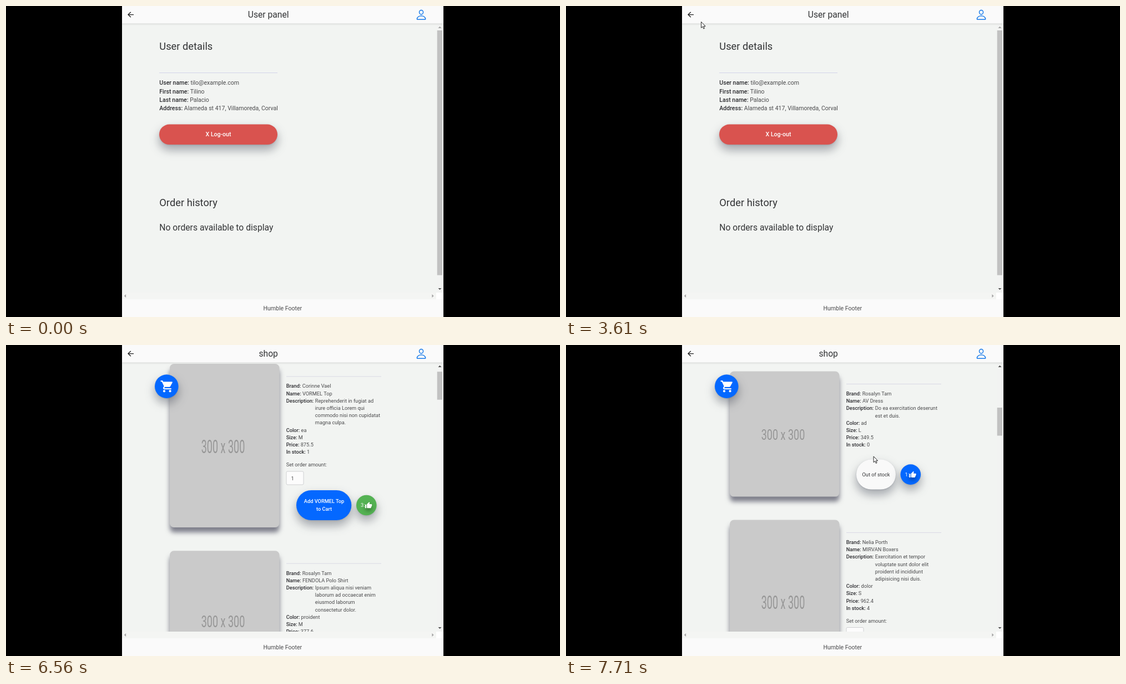
Animation of 998x561 px, one loop 8 s. Source, as an HTML page:

```html
<!DOCTYPE html>
<html lang="en">
<head>
<meta charset="utf-8">
<title>Shop</title>
<style>
html, body { margin: 0; width: 100%; height: 100%; overflow: hidden; background: #000; }
svg { display: block; width: 100vw; height: 100vh; }
text { font-family: Roboto, sans-serif; fill: #4a4a4c; white-space: pre; }
.dark { fill: #333436; }
.label { font-weight: 500; fill: #2c2c30; }
.medium { font-weight: 500; }
.white { fill: #fff; }
.card { fill: #cacaca; filter: drop-shadow(0 9px 4.5px rgba(20, 20, 45, .52)); }
.raised { filter: drop-shadow(0 9px 9px rgba(40, 45, 60, .36)) drop-shadow(0 1px 1px rgba(40, 45, 60, .16)); }
.bar { filter: drop-shadow(0 1px 1.5px rgba(0, 0, 0, .14)); }
</style>
</head>
<body>
<svg id="stage" viewBox="0 0 998 561" preserveAspectRatio="none">
  <defs>
    <clipPath id="app"><rect x="209" width="579" height="561"/></clipPath>
    <clipPath id="view"><rect x="209" y="31" width="567" height="486"/></clipPath>
    <path id="thumb" d="M1 21h4V9H1v12zm22-11c0-1.1-.9-2-2-2h-6.3l.95-4.6c.1-.6-.1-1-.4-1.4L14.2 1 7.6 7.6C7.2 8 7 8.5 7 9v10c0 1.1.9 2 2 2h9c.8 0 1.5-.5 1.8-1.2l3-7c.1-.3.2-.5.2-.8z"/>
  </defs>
  <g id="root" clip-path="url(#app)"></g>
</svg>
<script>
const LOOP = 8000;
const root = document.getElementById('root');
const SMALL = 9.23, BODY = 10.55, TITLE = 15.7, HEAD = 18.3;
const PAGE = '#f2f4f2', BAR = '#fafafa', BLUE = '#0468ff', GREEN = '#54b253';

const attrs = o => Object.entries(o).map(([k, v]) => `${k}="${v}"`).join(' ');
const rect = (x, y, width, height, fill, more = {}) => `<rect ${attrs({ x, y, width, height, fill, ...more })}/>`;
// y is the middle of the capitals
const text = (x, y, size, str, cls = '', anchor = 'start') =>
  `<text x="${x}" y="${y + size * .355}" font-size="${size}" class="${cls}" text-anchor="${anchor}">${str}</text>`;
const field = (x, y, size, name, value) =>
  text(x, y, size, `<tspan class="label">${name}:</tspan> ${value}`);
const tri = (x, y, turn, fill, id = '') =>
  `<path ${id && `id="${id}"`} d="M-3 1.6L0-1.6L3 1.6z" fill="${fill}" transform="translate(${x} ${y}) rotate(${turn})"/>`;

function header(title) {
  return rect(209, 0, 579, 31.5, BAR, { class: 'bar' }) +
    text(472.7, 15.6, TITLE, title, 'dark', 'middle') +
    `<path d="M230 15.6H220.5M224.8 10.9L220 15.6L224.8 20.3" fill="none" stroke="#222" stroke-width="1.4"/>
     <g fill="none" stroke="#1478ea" stroke-width="36" stroke-linejoin="round" transform="translate(737.8 5.6) scale(.04)">
       <path d="M344 144C340 197 300 240 256 240S172 197 168 144C164 89 203 48 256 48S348 90 344 144z"/>
       <path d="M256 304C169 304 81 352 64 443C62 454 69 464 80 464H432C443 464 450 454 448 443C431 352 343 304 256 304z"/></g>`;
}

function scrollbars(id, thumbHeight) {
  return rect(776, 32, 12, 485, '#f2f3f2') + rect(209, 517, 566, 12, '#f4f5f3') + rect(775, 517, 13, 12, '#fff') +
    tri(781.5, 38.3, 0, '#a3a3a3', id + 'Up') + tri(781.5, 510.5, 180, '#505050') +
    tri(214.5, 523, -90, '#a3a3a3') + tri(769, 523, 90, '#a3a3a3') +
    rect(776.7, 44, 9.3, thumbHeight, '#c1c1c1', { id: id + 'Thumb' });
}

function like(x, y, count, fill) {
  return `<circle cx="${x}" cy="${y}" r="18.3" fill="${fill}" class="raised"/>` +
    text(x - 10.3, y, SMALL, count + ':', 'white') +
    `<use href="#thumb" fill="#fff" transform="translate(${x - 3} ${y - 6.4}) scale(.56)"
      style="filter:drop-shadow(0 8px 7px rgba(0,0,0,.4))"/>`;
}

function product(p, i) {
  const row = n => p.top + 40.2 + n * 13.2;
  const n = p.about.length;
  const stockY = row(n + 5);
  const buttonY = stockY + (p.stock ? 69 : 26.5);
  const height = buttonY + 67 - p.top;
  let s = rect(295, p.top, 197.5, height, '#cacaca', { rx: 7.5, class: 'card' }) +
    `<g transform="translate(391 ${p.top + height / 2 + 1.5}) scale(.53 ${height / 300})">
      <text y="12" font-size="34" text-anchor="middle" style="fill:#969696">300 x 300</text></g>` +
    rect(505, p.top + 22.4, 171, 1, '#d9d9e4') +
    field(504.7, row(0), SMALL, 'Brand', p.brand) +
    field(504.7, row(1), SMALL, 'Name', p.name) +
    text(504.7, row(2), SMALL, 'Description:', 'label') +
    p.about.map((line, k) => text(556.8, row(2 + k), SMALL, line)).join('') +
    ['Color', 'Size', 'Price', 'In stock'].map((name, k) =>
      field(504.7, row(n + 2 + k), SMALL, name, [p.color, p.size, p.price, p.stock][k])).join('');
  if (p.stock) {
    s += text(504.7, stockY + 23, SMALL, 'Set order amount:') +
      rect(505, stockY + 35, 31, 24, '#fcfcfc', { rx: 2, stroke: '#cfd0d2', 'stroke-width': 1 }) +
      text(513.5, stockY + 47.3, SMALL, '1') +
      rect(523, buttonY, 99.3, 54, BLUE, { rx: 27, class: 'raised', id: 'add' + i }) +
      text(573, buttonY + 20.2, SMALL, 'Add ' + p.name, 'white medium', 'middle') +
      text(573, buttonY + 33.4, SMALL, 'to Cart', 'white medium', 'middle');
  } else {
    s += rect(523, buttonY, 71, 54, '#f9f9f9', { rx: 27, class: 'raised' }) +
      text(558.5, buttonY + 27, SMALL, 'Out of stock', 'dark', 'middle');
  }
  return s + like(p.stock ? 649.3 : 620.8, buttonY + 27, p.likes, p.likes > 1 ? GREEN : BLUE);
}

const products = [
  { top: 74, brand: 'Corinne Vael', name: 'VORMEL Top', color: 'ea', size: 'M', price: 875.5, stock: 1, likes: 3,
    about: ['Reprehenderit in fugiat ad', 'irure officia Lorem qui', 'commodo nisi non cupidatat', 'magna culpa.'] },
  { top: 411.2, brand: 'Rosalyn Tarn', name: 'FENDOLA Polo Shirt', color: 'proident', size: 'M', price: 377.6, stock: 0, likes: 3,
    about: ['Ipsum aliqua nisi veniam', 'laborum ad occaecat enim', 'eiusmod laborum', 'consectetur dolor.'] },
  { top: 706, brand: 'Rosalyn Tarn', name: 'AV Dress', color: 'ad', size: 'L', price: 349.5, stock: 0, likes: 1,
    about: ['Do ea exercitation deserunt', 'est et duis.'] },
  { top: 974, brand: 'Nelia Porth', name: 'MIRVAN Boxers', color: 'dolor', size: 'S', price: 962.4, stock: 4, likes: 1,
    about: ['Exercitation et tempor', 'voluptate sunt dolor elit', 'proident id incididunt', 'adipisicing nisi duis.'] }
];

const shopPage = rect(209, 0, 579, 561, PAGE) +
  `<g clip-path="url(#view)"><g id="list">${products.map(product).join('')}</g></g>
   <circle cx="289.3" cy="74.6" r="21.3" fill="${BLUE}" class="raised"/>
   <path transform="translate(277.6 62) scale(1.06)" fill="#fff" d="M7 18a2 2 0 1 0 0 4 2 2 0 0 0 0-4zM1 2v2h2l3.6 7.6-1.35 2.4c-.7 1.4.3 3 1.75 3h12v-2H7.4c-.2 0-.3-.2-.2-.4l.9-1.6h7.45c.75 0 1.4-.4 1.75-1L20.9 5.5C21.2 4.8 20.7 4 20 4H5.2l-.9-2zM17 18a2 2 0 1 0 0 4 2 2 0 0 0 0-4z"/>` +
  scrollbars('shop', 50.5) + header('shop');

const details = [
  ['User name', 'tilo@example.com'],
  ['First name', 'Tilino'],
  ['Last name', 'Palacio'],
  ['Address', 'Alameda st 417, Villamoreda, Corval']
];

const userPage = rect(209, 0, 579, 561, PAGE) +
  text(276.3, 73, HEAD, 'User details', 'dark') +
  rect(276, 120, 213, 1, '#d3d3ea') +
  details.map(([name, value], i) => field(276.3, 138.6 + i * 15.35, BODY, name, value)).join('') +
  rect(276, 213.5, 213, 36.6, '#d9534f', { rx: 18.3, class: 'raised' }) +
  text(382.5, 231.7, BODY, 'X Log-out', 'white medium', 'middle') +
  text(276.3, 354.7, HEAD, 'Order history', 'dark') +
  text(276.3, 399.3, TITLE, 'No orders available to display', 'dark') +
  scrollbars('user', 441.5) + header('User panel');

root.innerHTML = `<g>${shopPage}</g><g id="user">${userPage}</g>` +
  rect(209, 529, 579, 32, BAR) + text(498.3, 545.2, BODY, 'Humble Footer', '', 'middle') +
  `<g id="cursor" fill="#fff" stroke="#111" stroke-width=".9" stroke-linejoin="round">
    <path id="arrow" d="M.6.6V11.4L3.1 9.1L4.9 13.1L6.6 12.3L4.9 8.5H8.2z"/>
    <path id="hand" transform="translate(-1 0)" d="M1.6 1.8C1.6.2 3.8.2 3.8 1.8V6.2C4.6 5.4 5.7 5.6 6 6.6C6.8 6 7.9 6.3 8.1 7.1C9 6.7 10 7.2 10 8.2V11.6C10 13 8.8 14 8.8 16H2.9C2.6 13.6-.6 11.6-1.8 9.4C-2.3 8.2-.8 7.5.2 8.6L1.6 10zM3.8 6.2V9M6 6.6V9M8.1 7.1V9"/>
  </g>`;

const el = id => document.getElementById(id);

// Keys are [time, ...values]; values run straight between them.
function track(keys, t) {
  if (t <= keys[0][0]) return keys[0].slice(1);
  const i = keys.findIndex(k => k[0] > t);
  if (i < 0) return keys[keys.length - 1].slice(1);
  const a = keys[i - 1], b = keys[i];
  const u = (t - a[0]) / (b[0] - a[0]);
  return a.slice(1).map((v, j) => v + (b[j + 1] - v) * u);
}

const pointerKeys = [
  [1760, 443.7, 174.5], [2020, 415, 152], [2160, 415, 152], [2720, 335, 95], [3310, 335, 95],
  [3610, 243, 28], [4100, 226, 16], [4900, 226, 16], [5220, 300, 125], [5360, 300, 125],
  [5480, 353, 184.5], [5750, 400, 205], [6090, 400, 205], [6400, 553.5, 200.3]
];
const scrollKeys = [
  [6500, 0], [6560, 40], [6660, 40], [6760, 78], [6880, 115], [7000, 140],
  [7110, 196.5], [7300, 335], [7580, 610], [7700, 658.5]
];
const BACK = 4340, FADE = 200;

function draw(t) {
  const leave = Math.min(1, Math.max(0, (t - BACK) / FADE));
  const eased = leave * leave;
  el('user').setAttribute('opacity', 1 - eased);
  el('user').setAttribute('transform', `translate(0 ${40 * eased})`);
  el('user').setAttribute('display', leave < 1 ? 'inline' : 'none');

  const [scroll] = track(scrollKeys, t);
  el('list').setAttribute('transform', `translate(0 ${-scroll})`);
  el('shopThumb').setAttribute('y', 44 + scroll * .1048);
  el('shopUp').setAttribute('fill', scroll > 0 ? '#505050' : '#a3a3a3');

  const overAdd = scroll > 98 && scroll < 200;
  const overLabel = scroll > 30 && scroll < 68;
  el('add0').setAttribute('fill', overAdd ? '#1a75ff' : BLUE);

  const [x, y] = track(pointerKeys, t);
  el('cursor').setAttribute('transform', `translate(${x} ${y})`);
  el('cursor').setAttribute('display', t >= 1760 && !overLabel ? 'inline' : 'none');
  el('arrow').setAttribute('display', overAdd ? 'none' : 'inline');
  el('hand').setAttribute('display', overAdd ? 'inline' : 'none');
}

const start = performance.now();
function tick() {
  draw((performance.now() - start) % LOOP);
  requestAnimationFrame(tick);
}
draw(0);
requestAnimationFrame(tick);
</script>
</body>
</html>
```
